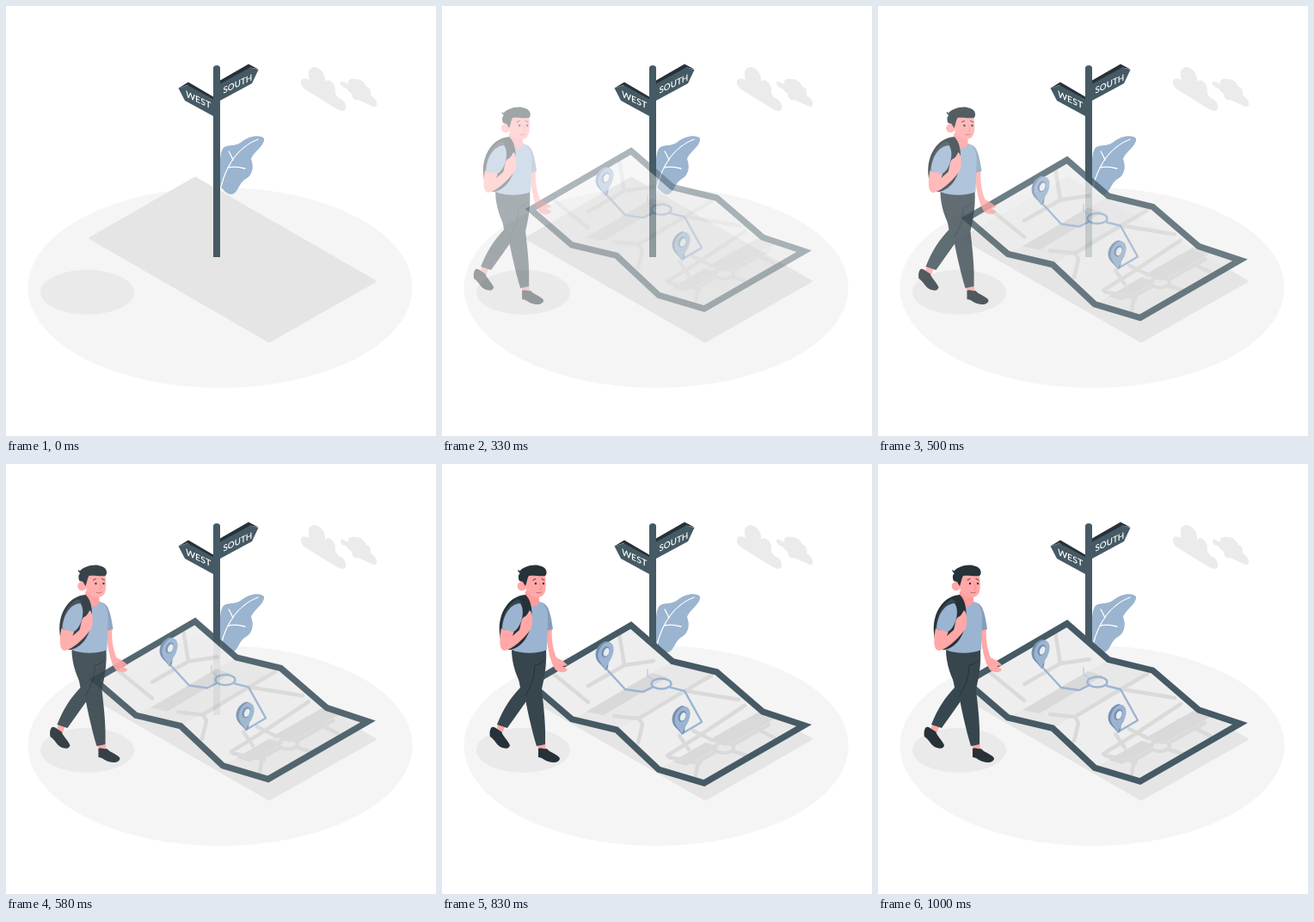
An HTML page that plays this animation: 500 by 500 pixels, repeating every 1.04 s.

```html
<!DOCTYPE html>
<html lang="en">
<head>
<meta charset="utf-8">
<title>Walking across a map</title>
<style>
  html, body { margin: 0; width: 100%; height: 100%; overflow: hidden; background: #fff; }
  svg { display: block; width: 100%; height: 100%; }
  text { font: 600 10.2px Lato, "Open Sans", sans-serif; fill: #fff; }
  .line { fill: none; stroke-linecap: round; stroke-linejoin: round; }
</style>
</head>
<body>
<svg viewBox="0 0 500 500">
  <defs>
    <path id="outline" d="M219.800 185.500L268 227.500L319.500 240L373 286L421 302L304.800 369L252 353.200L203 307.200L151 294.800L103 253.500Z"/>
    <clipPath id="sheet"><use href="#outline"/></clipPath>
    <g id="pin">
      <path fill="#7690b0" d="M1 21C-3 14-10 12-10.500 3C-10-6-4-12 2-13L7-11L4 18Z"/>
      <path fill="#9bb4d2" d="M1 21C-1 14-7 12-7.500 4C-7-5-1-12 5-12C11-11 12-3 9 4C7 10 3 13 1 21Z"/>
      <ellipse cx="1" cy="-1" rx="4.600" ry="6.700" fill="#7690b0" transform="rotate(22)"/>
      <ellipse cx="2" cy="-1" rx="3" ry="5" fill="#e8edf2" transform="rotate(22)"/>
    </g>
  </defs>

  <!-- ground -->
  <ellipse cx="249" cy="327.500" rx="223.500" ry="116.500" fill="#f5f5f5"/>
  <ellipse cx="94.500" cy="332.800" rx="54.500" ry="26" fill="#eaeaea"/>
  <path fill="#e5e5e5" stroke="#e5e5e5" stroke-width="3" stroke-linejoin="round" d="M98 270L220 200L429 320L306 390Z"/>

  <!-- clouds -->
  <g fill="#ebebeb">
    <path d="M343 87C344 83 349 84 353 86C350 78 352 71 359 71C366 72 372 79 371 88C374 84 381 87 383 96C382 101 384 104 387 107C393 109 396 114 395 120C393 123 389 122 385 120L348 97C344 94 342 91 343 87Z"/>
    <path d="M389 88C391 87 394 89 398 91C397 86 400 84 405 85C411 84 417 88 419 94C423 94 425 99 424 104C429 107 432 111 431 116C429 118 426 117 423 115L409 109C406 111 402 107 402 102C399 100 397 98 396 96C392 95 388 92 389 88Z"/>
  </g>

  <!-- leaf -->
  <path fill="#9bb4d0" d="M249 178C250 170 251 165 255 163.500C262 161 268 163 274 158C282 151 296 149 300 154C301 163 288 169 285 178C289 188 286 197 279 201C270 206 270 218 262 219C256 219 252 212 248 209Z"/>
  <path class="line" stroke="#fff" stroke-width="1.300" d="M250 210C256 187 269 164 293 155M258 188Q267 186 278 189M264 179Q262 174 259 169"/>

  <!-- signpost -->
  <path fill="#455a64" d="M241 72C241 68 249 68 249 72V292H241Z"/>
  <path fill="#455a64" d="M249 90L282 71L293.500 74L286 90L249 110Z"/>
  <path fill="#263238" d="M249 86.500L282 67.500L293.500 73.500L284 71.500L249 90.500Z"/>
  <path fill="#455a64" d="M200.500 95.500L212 92L241 109V128L208 110Z"/>
  <path fill="#263238" d="M200.500 95.500L212 88.500L241 105.500V109L211 92Z"/>
  <text transform="matrix(1.040 .500 0 1 209 105.500)">WEST</text>
  <text transform="matrix(.960 -.450 0 1 252.500 102)">SOUTH</text>

  <g id="map">
    <g clip-path="url(#sheet)">
      <use href="#outline" fill="#eee"/>
      <path fill="#e8e8e8" d="M150 296L269 227L320 239L202 308ZM251 354L373 285L430 301L305 373Z"/>
      <path fill="#d9d9d9" d="M168 286L244 241L262 246L188 290ZM268 344L306 322L322 327L284 349ZM310 319L372 284L392 291L330 326Z"/>
      <g class="line" stroke="#dadada" stroke-width="4.500">
        <path d="M126 239L170 275M206 195L212 232L170 256M212 232L246 227M200 291L229 294L233 301L228 322M229 294L262 274L313 244M284 262L345 272M262 337L296 316L352 279M276 314L287 330M292 308L314 319"/>
        <path d="M319 332L298 344L294 366M264 339L300 346M339 324L380 301M338 332L364 340M350 298L386 316"/>
        <ellipse cx="328" cy="328" rx="11" ry="6" stroke-width="4"/>
      </g>
      <g class="line" stroke="#9bb4d2" stroke-width="2.400">
        <path d="M190 235L213 260L234 263L246 257M266 258L282 262L302 298L280 311"/>
        <path d="M239 237V245L246 249" stroke="#c0cddb" stroke-width="1.500"/>
        <ellipse cx="255" cy="253.500" rx="11.500" ry="6"/>
      </g>
    </g>
    <use href="#outline" fill="none" stroke="#455a64" stroke-width="7.300"/>
    <use href="#pin" x="189" y="217"/>
    <use href="#pin" x="278" y="292"/>
  </g>

  <g id="walker">
    <!-- legs and shoes -->
    <path fill="#ffa8a7" d="M64 300L72 304L68 313L61 310ZM109 322L118 322L119 334L110 334Z"/>
    <path fill="#263238" d="M56 306C60 305 62 309 67 311C69 317 74 320 77 327C76 332 71 331 66 329C61 326 60 321 54 317C53 312 54 308 56 306ZM110 331C113 329 116 332 120 331C124 336 132 337 135 342C135 347 128 348 122 346C117 345 115 341 110 341Z"/>
    <path fill="#37474f" d="M82 222L107 238C107 256 104 267 96 276L74 307L62 303C70 283 78 272 89 260Z"/>
    <path fill="#37464d" d="M79 216C79 232 85 249 93 262C96 281 102 308 108 328L118 326C119 302 116 281 114 262C118 245 120 231 119 215Z"/>
    <path class="line" stroke="#263238" d="M116 229Q111 234 106 234Q106 253 95 269"/>

    <!-- far arm -->
    <path fill="#ffa8a7" d="M119 190L126 192C125 203 127 215 131 225C137 228 142 231 144 234L138 235L144 239C142 243 136 243 131 240C125 234 120 215 119 190Z"/>
    <path fill="#859dbb" d="M112 161C121 161 124 171 127 192L116 195Z"/>

    <!-- torso -->
    <path fill="#9bb4d2" d="M84 166C90 158 101 158 112 160C120 164 122 172 121 186L120 216C109 221 90 221 79 216L82 195Z"/>
    <path fill="#ff9b9b" d="M95 148H111V161C107 168 98 167 94 160Z"/>

    <!-- backpack -->
    <path fill="#263238" d="M95 152C77 153 63 172 65 196C66 209 70 217 78 216C91 213 100 200 102 184C104 169 101 157 95 152Z"/>
    <path fill="#37474f" d="M86 157C74 163 68 177 67 191L71 189C73 175 80 164 91 161Z"/>
    <path fill="#9bb4d2" d="M89 162C76 163 69 177 68 191Q75 196 83 194C91 187 95 170 89 162Z"/>

    <!-- near arm -->
    <path fill="#ffa8a7" d="M67 191C64 206 65 217 71 217C79 216 94 203 102 191C104 183 104 174 100 170C98 173 97 177 93 178C89 182 90 188 88 193L80 200L82 194Q74 195 67 191Z"/>

    <!-- head -->
    <circle cx="91" cy="142" r="5.300" fill="#ffa8a7"/>
    <path fill="#ffa8a7" d="M95 129L118 129C119 139 120 149 115 153C110 157 101 154 96 149Z"/>
    <path fill="#263238" d="M88 125C92 119 106 115 114 119C120 121 121 127 118 130C111 131 105 129 99 130C97 133 97 137 95 142L92 137L88 136C86 132 87 128 89 127Z"/>
    <path class="line" stroke="#263238" stroke-width="1.600" d="M90 127Q88 126 87 124"/>
    <path class="line" stroke="#263238" stroke-width=".9" d="M104 135L107 133.500M114 133.500L117 135"/>
    <g fill="#263238"><circle cx="107" cy="139" r="1.200"/><circle cx="116" cy="139" r="1.200"/></g>
    <path class="line" stroke="#f28f8f" d="M112 139L114 145L111 146"/>
    <path class="line" stroke="#b0585a" stroke-width=".8" d="M108 149.500Q111 151 114 149"/>
  </g>
</svg>
<script>
  const LOOP = 1040, FRAME = 1000 / 24, HIDDEN_FRAMES = 3, DISTANCE = 30;
  const map = document.getElementById('map');
  const walker = document.getElementById('walker');

  const bezier = (a, b, s) =>
    3 * (1 - s) ** 2 * s * a + 3 * (1 - s) * s * s * b + s ** 3;

  // Ease with a small overshoot: cubic-bezier(.36, -.01, .5, 1.38)
  function ease(x) {
    if (x >= 1) return 1;
    let low = 0, high = 1;
    for (let i = 0; i < 24; i++) {
      const mid = (low + high) / 2;
      if (bezier(.36, .5, mid) < x) low = mid; else high = mid;
    }
    return bezier(-.01, 1.38, low);
  }

  function draw(ms) {
    const step = Math.floor((ms + 3.5) / FRAME);
    const progress = ease((step + .5) / 24);
    const offset = DISTANCE * (progress - 1);
    const opacity = step < HIDDEN_FRAMES ? 0 : Math.min(1, progress);
    map.setAttribute('transform', `translate(0 ${offset})`);
    walker.setAttribute('transform', `translate(${offset} 0)`);
    for (const part of [map, walker]) part.setAttribute('opacity', opacity);
  }

  const start = performance.now();
  function tick() {
    draw((performance.now() - start) % LOOP);
    requestAnimationFrame(tick);
  }
  tick();
</script>
</body>
</html>
```
